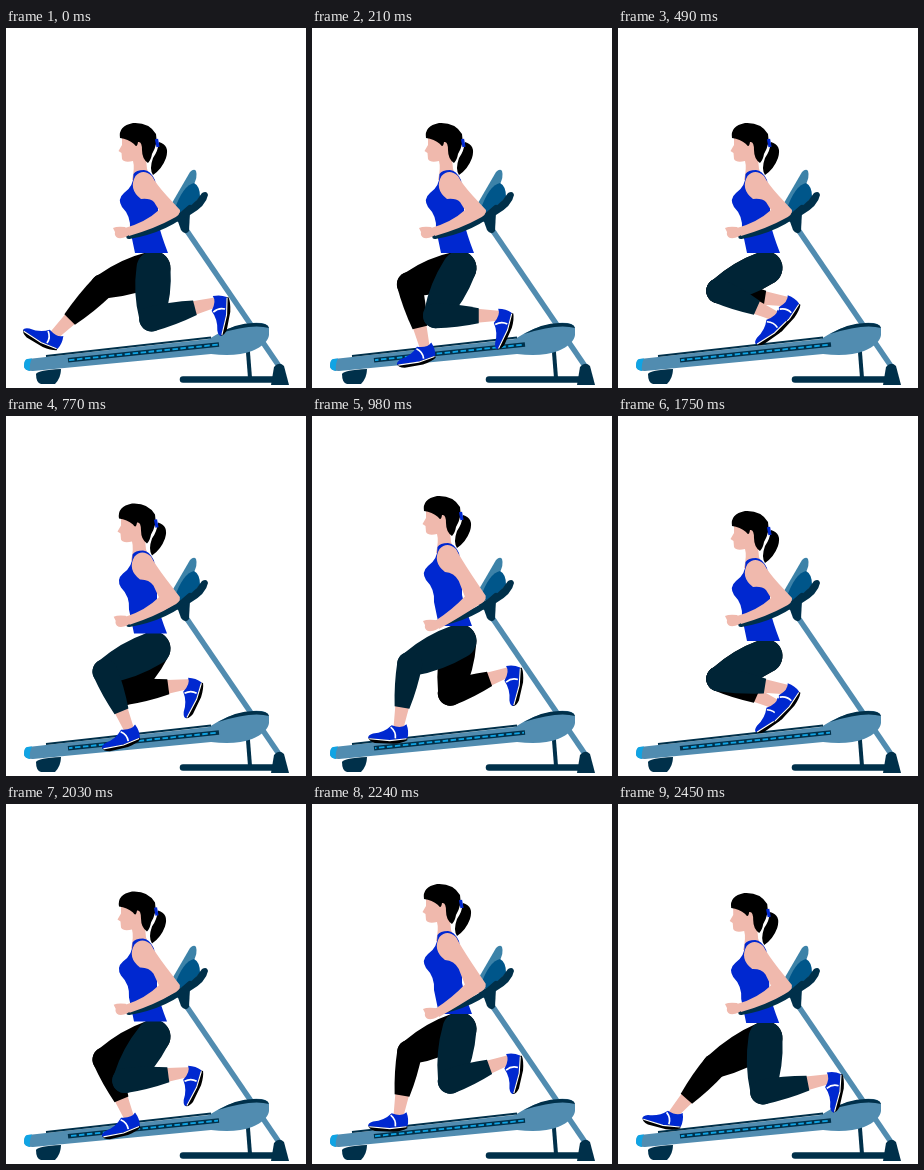
Write an HTML page with a canvas that moves like this. It is 300 by 360 pixels and loops after 2520 ms.

```html
<!DOCTYPE html>
<html>
<head>
<meta charset="utf-8">
<title>Treadmill run</title>
<style>
  html, body { margin: 0; width: 100%; height: 100%; overflow: hidden; background: #fff; }
  canvas { display: block; }
</style>
</head>
<body>
<canvas id="stage" width="300" height="360"></canvas>
<script>
const ctx = document.getElementById('stage').getContext('2d');
const NAVY = '#002436', BLACK = '#000', BLUE = '#0028d0', SKIN = '#f0b9ad',
      STEEL = '#518cb0', DARK = '#00304a', MID = '#00568a', PANEL = '#3c82a8', CYAN = '#10a4e4';
const STEP = 70, STEPS = 36;

// step, thigh angle, thigh length, calf angle, calf length, foot angle
const LEG = [
  [0, 92, 51, -14.5, 62, -82],
  [1, 98, 54, -12, 61, -85],
  [7, 154, 52, 24, 58, -38],
  [14, 155, 55, 100, 61, 0],
  [17, 151, 58, 131, 60, 12],
  [18, 160, 54, 135, 65, 28],
  [19, 166, 53, 110, 60, 5],
  [25, 154, 52, 9, 65, -50],
  [32, 100, 53, -20, 58, -80],
  [35, 93, 54, -11, 64, -80],
  [36, 92, 51, -14.5, 62, -82]
];
// step, lift of the body
const LIFT = [[0, 0], [8, 0], [14, 15], [15, 15], [16, 12], [20, 0],
              [26, 0], [32, 15], [33, 15], [34, 12], [36, 0]];

function sample(keys, t) {
  const i = keys.findIndex(k => k[0] > t), a = keys[i - 1], b = keys[i];
  const k = (t - a[0]) / (b[0] - a[0]);
  return a.map((v, j) => v + (b[j] - v) * k).slice(1);
}

const rad = deg => deg * Math.PI / 180;
const polar = ([x, y], deg, r) => [x + r * Math.cos(rad(deg)), y + r * Math.sin(rad(deg))];

function fill(path, color) {
  ctx.fillStyle = color;
  ctx.fill(new Path2D(path));
}

function line(path, color, width, cap = 'butt') {
  ctx.strokeStyle = color;
  ctx.lineWidth = width;
  ctx.lineCap = cap;
  ctx.stroke(new Path2D(path));
}

// Tapered limb with a round start, bulging sides and an optional round end
function limb(a, ra, b, rb, color, bulge = 0, roundEnd = true) {
  const dir = Math.atan2(b[1] - a[1], b[0] - a[0]) * 180 / Math.PI;
  const mid = [(a[0] + b[0]) / 2, (a[1] + b[1]) / 2], r = (ra + rb) / 2 + bulge * 2;
  ctx.fillStyle = color;
  ctx.beginPath();
  ctx.arc(...a, ra, rad(dir + 90), rad(dir + 270));
  ctx.quadraticCurveTo(...polar(mid, dir - 90, r), ...polar(b, dir - 90, rb));
  if (roundEnd) ctx.arc(...b, rb, rad(dir - 90), rad(dir + 90));
  else ctx.lineTo(...polar(b, dir + 90, rb));
  ctx.quadraticCurveTo(...polar(mid, dir + 90, r), ...polar(a, dir + 90, ra));
  ctx.fill();
}

function shoe([x, y], angle) {
  ctx.save();
  ctx.translate(x, y);
  ctx.rotate(rad(angle));
  ctx.scale(.93, .93);
  fill('M-33 14Q-33 18-26 20L-6 21Q4 20 9 17L8 12L-6 14Z', BLACK);
  fill('M-8 1Q-16 9-28 10Q-34 12-33 15L-10 17L9 15Q11 8 8 0Q3 5-8 1Z', BLUE);
  line('M-32 15.5L-10 17.5L8 15.5', '#fff', 1.2);
  line('M-9 3Q-3 8-4 15', '#fff', 1.8);
  ctx.restore();
}

function leg(hip, step, color) {
  const [thigh, thighLen, calf, calfLen, foot] = sample(LEG, step % STEPS);
  const knee = polar(hip, thigh, thighLen), ankle = polar(knee, calf, calfLen);
  limb(polar(knee, calf, calfLen * .6), 7.5, polar(ankle, calf, 3), 5, SKIN);
  shoe(ankle, foot);
  limb(hip, 17, knee, 12.5, color, 2.5);
  limb(knee, 12.5, polar(knee, calf, calfLen * .72), 7.5, color, 1, false);
}

function treadmill(step) {
  line('M177 351.5H268', DARK, 6.5, 'round');
  line('M241.5 318L244 350', DARK, 4);
  line('M181 203L275 341', STEEL, 5.5);
  fill('M265 357L268 339Q273 333 278 338L283 357Z', DARK);
  fill('M30 346Q32 342 55 341Q55 350 49 356H35Q30 355 30 346Z', DARK);
  fill('M22 331L203 311Q222 298 246 295Q262 294 263 300V307Q262 316 246 323Q230 329 205 326L27 343Q18 343 18 338Q18 332 22 331Z', STEEL);
  fill('M21 331L26 330.5Q23 336 24 343Q18 342 18 338Q18 332 21 331Z', CYAN);
  line('M40 328L205 309.5', DARK, 1.8);
  fill('M212 306Q232 294 250 295Q262 295 263 300Q246 295 212 306Z', DARK);
  line('M62 332.2L213 316.5', DARK, 4.6);
  ctx.save();
  ctx.setLineDash([5.5, 2.5]);
  ctx.lineDashOffset = -step * 2;
  line('M63 332.1L212 316.6', CYAN, 1.8);
  ctx.restore();
}

function consolePanel() {
  fill('M170 188L184 184L183 203Q179 208 175 202Z', DARK);
  fill('M166 175L184 144Q188 140 190 143Q192 149 187 158L173 182Z', PANEL);
  fill('M168 183Q177 157 188 155Q194 158 194 169Q184 182 170 186Z', MID);
  line('M123 208Q162 201 184 180', DARK, 6, 'round');
  fill('M166 188Q187 180 196 165Q201 162 202 167Q200 178 184 187L172 194Z', DARK);
}

function torso() {
  fill('M116 106L116 117L112.5 123L115.5 125L116 131Q118 135 127 133Q129 140 126 152L150 160L141 141L139 120L132 104Z', SKIN);
  fill('M114 110Q112 98 127 95Q143 94 150 106Q152 116 146 126Q145 132 142 135Q136 131 136 122Q136 113 132 114Q131 121 128 116Q122 111 114 110Z', BLACK);
  fill('M153 114Q164 117 160 130Q156 141 147 147Q143 141 147 130Q152 123 153 114Z', BLACK);
  line('M150.5 111L152 119', BLUE, 3.2);
  fill('M127.5 146Q128 158 118 165Q111 171 116 179Q125 188 124 201L129 225H162Q155 207 152 194L152 170L149 152Q144 142 138 142Q130 142 127.5 146Z', BLUE);
}

// Shoulder follows the body while elbow and hand stay by the rail
function arm(dx, dy) {
  const at = (x, y, w) => (x + dx * w) + ' ' + (y + dy * w);
  const grip = Math.max(0, (-dy - 6) / 9), hx = 4 * grip, hy = 5 * grip;
  const hand = (x, y) => (x + hx) + ' ' + (y + hy);
  fill(`M${at(129.5, 148, 1)}Q${at(137, 140, 1)} ${at(146, 148, 1)}
    Q${at(150, 156, 1)} ${at(161, 168, .6)}L${at(174, 182, .15)}
    Q${at(175, 187, .1)} ${at(166, 191, .1)}Q150 200 ${hand(123, 208)}
    L${hand(119, 200)}Q140 194 ${at(153, 182, .1)}
    L${at(148, 174, .6)}Q${at(144, 170, .9)} ${at(135, 171, 1)}
    Q${at(122, 161, 1)} ${at(129.5, 148, 1)}Z`, SKIN);
  fill(`M${hand(107, 200)}Q${hand(111, 198)} ${hand(119, 199)}L${hand(125, 205)}
    Q${hand(120, 211)} ${hand(112, 210)}Q${hand(108, 208)} ${hand(109, 204)}Z`, SKIN);
}

function draw(now) {
  const step = Math.floor(now / STEP) % STEPS;
  const [lift] = sample(LIFT, step), dx = -2 * lift / 15;
  const hip = [147.5, 240 - lift];
  ctx.fillStyle = '#fff';
  ctx.fillRect(0, 0, 300, 360);
  treadmill(step);
  leg(hip, step + STEPS / 2, BLACK);
  leg(hip, step, NAVY);
  ctx.save();
  ctx.translate(dx, -lift);
  torso();
  ctx.restore();
  consolePanel();
  arm(dx, -lift);
}

const start = performance.now();
function tick() {
  draw(performance.now() - start);
  requestAnimationFrame(tick);
}
tick();
</script>
</body>
</html>
```
